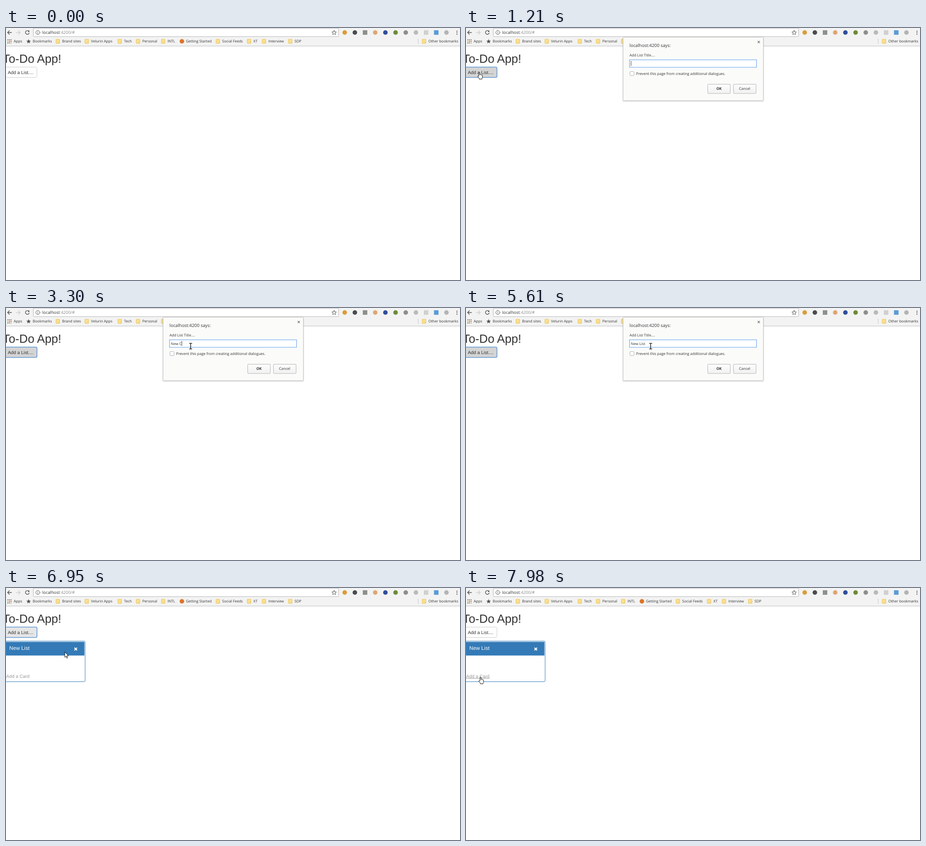
Animation, 1004 px wide and 558 px high, one loop 8 s. Source, as an HTML page:

```html
<!DOCTYPE html>
<html lang="en">
<head>
<meta charset="utf-8">
<title>To-Do App</title>
<style>
html, body { margin: 0; width: 100%; height: 100%; overflow: hidden; background: #fff; }
svg { display: block; width: 1004px; height: 558px; }
text { white-space: pre; text-rendering: geometricPrecision; }
.ui { font: 8.05px "Open Sans", "Noto Sans", sans-serif; fill: #333; }
.page { font: 10.2px "Liberation Sans", Arial, sans-serif; fill: #333; }
.line { fill: none; stroke-linecap: square; }
#btn { fill: #fff; stroke: #ccc; }
#btn.hover { fill: #e6e6e6; stroke: #adadad; }
#btn.held { fill: #d4d4d4; stroke: #5f96d4; stroke-width: 1.6; }
#btn.focus { fill: #e6e6e6; stroke: #5f96d4; stroke-width: 1.6; }
#link { fill: #999; }
#link.hover { text-decoration: underline; }
.push { fill: url(#face); stroke: #b3b3b3; }
.push + text { text-anchor: middle; }
</style>
</head>
<body>
<svg viewBox="0 0 1004 558">
  <defs>
    <linearGradient id="face" x2="0" y2="1">
      <stop stop-color="#fdfdfd"/><stop offset="1" stop-color="#f1f1f1"/>
    </linearGradient>
    <filter id="shade" x="-5%" y="-5%" width="110%" height="115%">
      <feDropShadow dx="0" dy="1" stdDeviation=".8" flood-opacity=".3"/>
    </filter>
    <g id="folder">
      <path d="M.5 1Q.5 .5 1 .5H8.5V9.5H1Q.5 9.5 .5 9Z" fill="#fbe08c" stroke="#e9c35f"/>
      <path d="M6 9.5V7H8.5" fill="#fdf0c0" stroke="#e9c35f" stroke-width=".7"/>
    </g>
    <path id="star" d="M0-5 1.4-1.7 5-1.4 2.3 .9 3.1 4.4 0 2.5-3.1 4.4-2.3 .9-5-1.4-1.4-1.7Z"/>
  </defs>

  <!-- browser bars -->
  <path d="M0 0H1004V40H0Z" fill="#f2f3f2"/>
  <path d="M0 40H1004" stroke="#bcbcbc"/>
  <rect x="60.5" y=".5" width="675" height="18.5" rx="1.5" fill="#fff" stroke="#b5b5b5"/>
  <g class="line" stroke-width="1.4" stroke="#505050">
    <path d="M12 10H4M7.5 6 3.5 10 7.5 14"/>
    <path d="M23 10H31M27.5 6 31.5 10 27.5 14" stroke="#cfcfcf"/>
    <path d="M50.6 7.2A4.2 4.2 0 1 0 51.2 11.3"/>
    <path d="M51.5 5V8.8H47.7Z" fill="#505050" stroke="none"/>
    <circle cx="70.5" cy="10" r="4.4" stroke-width="1"/>
    <path d="M70.5 9.8V12M70.5 7.8V7.9" stroke-width="1"/>
    <use href="#star" x="725.7" y="10.2" stroke-width="1"/>
  </g>
  <path d="M997.3 6V15" stroke="#505050" stroke-width="1.9" stroke-dasharray="1.9 1.7"/>
  <text class="ui" x="80" y="13.3" style="font-size:9.3px">localhost<tspan fill="#888">:4200/#</tspan></text>
  <g id="ext"></g>
  <g id="marks" class="ui">
    <use href="#star" x="50" y="29.6" fill="#555"/>
    <circle cx="389" cy="29.5" r="5" fill="#dd7429"/>
    <path d="M911.5 24V35" stroke="#c4c4c4"/>
  </g>

  <!-- page -->
  <g class="page">
    <text x="122.4" y="77" text-anchor="end" style="font-size:26.2px">To-Do App!</text>
    <rect id="btn" x="-8" y="86.5" width="76.5" height="23" rx="3"/>
    <text x="4" y="101.5">Add a List....</text>
    <g id="list">
      <rect x="-8" y="117.5" width="183" height="90" rx="2.5" fill="#fff" stroke="#337ab7"/>
      <path d="M0 119.2H173.4V149.6H0Z" fill="#337ab7"/>
      <text x="7.3" y="137.3" fill="#fff" style="font-size:11.65px">New List</text>
      <path d="M151.3 132.2 157.1 138M157.1 132.2 151.3 138" stroke="#fff" stroke-width="2.3"/>
      <text id="link" x=".5" y="198.6">Add a Card</text>
    </g>
  </g>

  <!-- prompt -->
  <g id="dialog" class="ui">
    <rect x="347.5" y="20.5" width="310" height="140.3" rx="1" fill="#fbfbfa" stroke="#bdbdbd" stroke-width=".8" filter="url(#shade)"/>
    <text x="361.5" y="42" style="font-size:9.85px">localhost:4200 says:</text>
    <path d="M645 28.6 649.8 33.4M649.8 28.6 645 33.4" stroke="#666" stroke-width="1.2"/>
    <text x="361.5" y="62.6">Add List Title....</text>
    <rect x="361.5" y="70.5" width="281" height="16.5" fill="#fff" stroke="#5a9bea"/>
    <text id="typed" x="364.6" y="81.5"></text>
    <path id="caret" d="M0 73V84" stroke="#222" stroke-width=".9"/>
    <rect x="362.5" y="96.5" width="9" height="9" rx="1" fill="#fff" stroke="#b0b0b0"/>
    <text x="376.3" y="103.7">Prevent this page from creating additional dialogues.</text>
    <rect class="push" x="534.5" y="124.5" width="50" height="20.5" rx="1.5"/>
    <text x="559.6" y="137.4" font-weight="700">OK</text>
    <rect class="push" x="591.5" y="124.5" width="50" height="20.5" rx="1.5"/>
    <text x="616.2" y="137.4">Cancel</text>
  </g>

  <g id="cursor" fill="#fff" stroke="#000" stroke-width=".95" stroke-linejoin="round">
    <path id="arrow" d="M.5 .5V12.4L3.1 9.9 5.1 14.4 6.8 13.6 4.9 9.3H8.7Z"/>
    <path id="hand" d="M-1.1 8.6V1Q-1.1 0 0 0T1.1 1V5.3Q2.2 4.5 3.1 5.6 4.3 5 5.1 6.2 6.9 5.9 6.8 8V11Q6.7 12.6 5.7 13.8V15.2H-.2V13.8L-3.5 9.7Q-3.8 8.4-2.6 8.2Z"/>
    <path id="beam" d="M-2.8-4.8H-1Q.4-4.8 .4-3.6V6.4Q.4 7.6-1 7.6H-2.8M3.6-4.8H1.8Q.4-4.8 .4-3.6M.4 6.4Q.4 7.6 1.8 7.6H3.6" fill="none" stroke-width="1.3"/>
  </g>
</svg>
<script>
const LOOP = 8000;
const $ = id => document.getElementById(id);
const add = (parent, tag, attrs, text = '') => {
  const el = document.createElementNS('http://www.w3.org/2000/svg', tag);
  for (const k in attrs) el.setAttribute(k, attrs[k]);
  el.textContent = text;
  parent.append(el);
};

// bookmarks bar
const label = (x, text) => add($('marks'), 'text', { x, y: 32.4 }, text);
const folders = [[110, 'Brand sites'], [174, 'Velurin Apps'], [247, 'Tech'], [287.5, 'Personal'],
  [343, 'INTL'], [464, 'Social Feeds'], [533, 'XT'], [566, 'Interview'], [624, 'SDP'], [920, 'Other bookmarks']];
for (const [x, text] of folders) {
  add($('marks'), 'use', { href: '#folder', x, y: 24.5 });
  label(x + 14, text);
}
label(17, 'Apps');
label(59, 'Bookmarks');
label(398, 'Getting Started');
['#d9534a', '#4a8a4f', '#4a7fc9', '#e0a63a', '#666'].forEach((fill, c, all) => {
  for (let i = c; i < 9; i += all.length)
    add($('marks'), 'rect', { x: 3 + i % 3 * 3.6, y: 25 + Math.floor(i / 3) * 3.6, width: 2.1, height: 2.1, fill });
});

// extension buttons
['#dd9b3c', '#4b4b50', '#8d918d', '#dfa676', '#2f4f9c', '#6d8a3a', '#8c8f8c', '#b9bbb9', '#cfd1cf', '#5b9bd8', '#b4b4b4']
  .forEach((fill, i) => {
    const x = 749 + i * 22.5;
    if ([2, 8, 9].includes(i)) add($('ext'), 'rect', { x: x - 5, y: 5, width: 10, height: 10, fill });
    else add($('ext'), 'circle', { cx: x, cy: 10, r: 5, fill });
  });

// field contents: time, text, caret shown
const typing = [[1210, '', 1], [1740, '', 0], [2280, '', 1], [2520, 'N', 1], [2670, 'Ne', 1], [2780, 'New', 1],
  [2990, 'New ', 1], [3300, 'New C', 1], [3830, 'New C', 0], [3990, 'New ', 1], [4540, 'New L', 1],
  [4760, 'New Li', 1], [4910, 'New Lis', 1], [5070, 'New List', 1], [5610, 'New List', 0], [6140, 'New List', 1]];

const smooth = p => p * p * (3 - 2 * p);
const out = p => 1 - (1 - p) ** 2;
// quadratic curve sampled at n points
const curve = (n, ease, first, a, c, b) => Array.from({ length: n }, (_, i) => {
  const u = ease(first ? i / (n - 1) : (i + 1) / n);
  return a.map((v, k) => v * (1 - u) ** 2 + 2 * c[k] * u * (1 - u) + b[k] * u * u);
});
const moves = [
  { from: 420, to: 1050, path: curve(9, out, true, [931, 504], [420, 230], [29.5, 98]) },
  { from: 1360, to: 1820, path: curve(7, smooth, false, [29.5, 98], [200, 98], [408, 83]) },
  { from: 5760, to: 6160, path: curve(6, smooth, false, [408, 83], [490, -22], [564, 135]) },
  { from: 6630, to: 7430, path: [[470, 127], [350, 120], [250, 122], [180, 132], [129.5, 141], [90, 145],
    [65, 145], [52, 144], [48, 143], [55, 143], [62, 144]] },
  { from: 7500, to: 7980, path: [[66, 152], [60, 168], [50, 184], [42, 196], [36, 201], [33, 199], [32, 197]] }
];

function pointer(t) {
  const m = moves.findLast(m => t >= m.from);
  if (!m) return null;
  const last = m.path.length - 1;
  const i = Math.floor((t - m.from) / (m.to - m.from) * last + 1e-6);
  return m.path[Math.min(i, last)];
}

const show = (id, on) => { $(id).style.display = on ? '' : 'none'; };

function render(t) {
  const open = t >= 1210 && t < 6390, listed = t >= 6470;
  show('dialog', open);
  show('list', listed);

  if (open) {
    const [, text, on] = typing.findLast(s => t >= s[0]);
    $('typed').textContent = text;
    show('caret', on);
    $('caret').setAttribute('transform', `translate(${365 + (text ? $('typed').getComputedTextLength() : 0)} 0)`);
  }

  const p = pointer(t), [x, y] = p || [-99, -99];
  const within = (l, r, top, bottom) => x >= l && x <= r && y >= top && y <= bottom;
  const onBtn = within(0, 69, 86, 110);
  const onLink = listed && within(0, 52, 190, 202);
  const onField = open && within(361, 643, 70, 87);
  const kind = onBtn || onLink ? 'hand' : onField ? 'beam' : 'arrow';
  show('cursor', p);
  for (const id of ['arrow', 'hand', 'beam']) show(id, id == kind);
  $('cursor').setAttribute('transform', `translate(${x} ${y})`);

  $('btn').setAttribute('class', t >= 7980 ? '' : listed ? 'focus' : t >= 1210 ? 'held' : onBtn ? 'hover' : '');
  $('link').setAttribute('class', onLink ? 'hover' : '');
}

function tick() {
  render(performance.now() % LOOP);
  requestAnimationFrame(tick);
}
tick();
</script>
</body>
</html>
```
